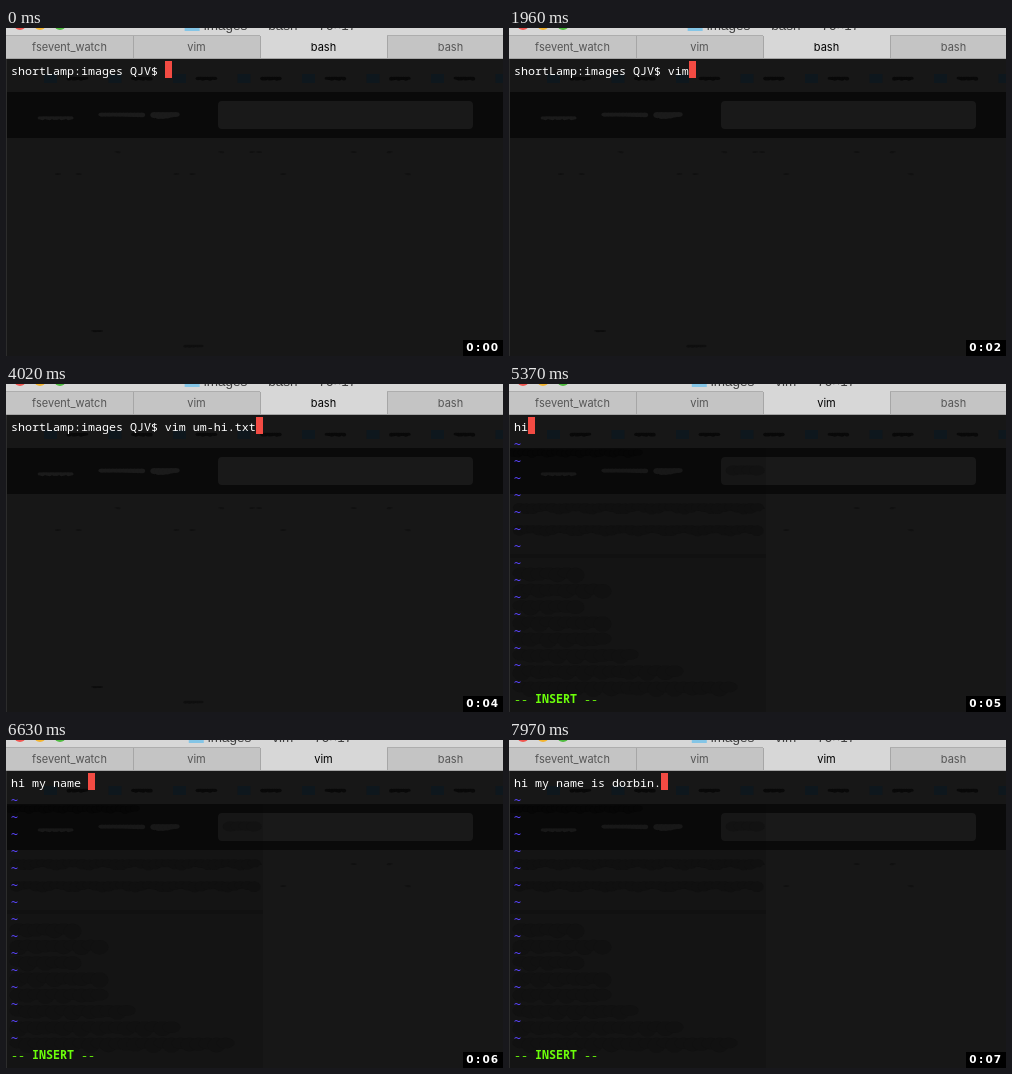
Recreate the animation shown at these times as an HTML page with a canvas. Size 497 px wide and 328 px high, loop 8000 ms.

```html
<!DOCTYPE html>
<html lang="en">
<head>
<meta charset="utf-8">
<title>Terminal session</title>
<style>
  html, body { margin: 0; width: 100%; height: 100%; overflow: hidden; background: #171717; }
  canvas { display: block; width: 497px; height: 328px; }
</style>
</head>
<body>
<canvas id="stage" width="497" height="328"></canvas>
<script>
const ctx = document.getElementById('stage').getContext('2d');

const WIDTH = 497, HEIGHT = 328, LOOP = 8000;
const CELL = 7, LINE = 17, LEFT = 5, TOP = 33;
const TAB = 127, TAB_TOP = 7, SCREEN_TOP = 31;
const MONO = '11.667px "Noto Sans Mono", "DejaVu Sans Mono", monospace';
const TILDE = '11.627px "DejaVu Sans Mono", monospace';
const LABEL = '11px Inter, "Liberation Sans", sans-serif';
const TITLE = '13.5px "Liberation Sans", Arial, sans-serif';
const CLOCK = 'bold 10.5px "DejaVu Sans", sans-serif';

const PROMPT = 'shortLamp:images QJV$ ';
const BLINK_OFF = 270, BLINK_ON = 810;
const VIM_OPEN = 4290, TITLE_CHANGE = 4380, INSERT_MODE = 4740;

// Bursts of typing at an even pace.
const COMMAND = [
  { at: 1260, pace: 85, keys: 'vim' },
  { at: 2050, pace: 177, keys: ' um-h' },
  { at: 2850, pace: 90, keys: 'i.' },
  { at: 3470, pace: 225, keys: 'txt' },
];
const MESSAGE = [
  { at: 5370, pace: 0, keys: 'hi' },
  { at: 5550, pace: 180, keys: ' my ' },
  { at: 6270, pace: 77, keys: 'name is ' },
  { at: 6990, pace: 90, keys: 'dor' },
  { at: 7440, pace: 85, keys: 'bin' },
  { at: 7970, pace: 0, keys: '.' },
];

const typed = (bursts, t) => bursts.map(({ at, pace, keys }) =>
  [...keys].filter((_, i) => t >= at + i * pace).join('')).join('');

// Repeatable pseudo-random number from 0 to 1.
const noise = n => {
  const v = Math.sin(n * 12.9898) * 43758.5453;
  return v - Math.floor(v);
};

function rect(x, y, w, h, color) {
  ctx.fillStyle = color;
  ctx.fillRect(x, y, w, h);
}

function disc(x, y, rx, ry, color) {
  ctx.fillStyle = color;
  ctx.beginPath();
  ctx.ellipse(x, y, rx, ry, 0, 0, Math.PI * 2);
  ctx.fill();
}

function text(str, x, y, font, color, align = 'left') {
  ctx.font = font;
  ctx.fillStyle = color;
  ctx.textAlign = align;
  ctx.fillText(str, x, y);
}

const rowText = (str, row, color, col = 0, font = MONO) =>
  text(str, LEFT + col * CELL, TOP + row * LINE + 14, font, color);

// Uneven streak, like blurred text behind translucent glass.
function smudge(x, y, w, h, color) {
  const step = Math.max(2, h * 0.6);
  for (let dx = h / 2; dx <= w - h / 2; dx += step) {
    const wobble = Math.sin((x + dx) * 1.7 + y);
    disc(x + dx, y + wobble * h * 0.08, step, h / 2 * (0.85 + wobble * 0.15), color);
  }
}

function drawBackdrop(inVim) {
  rect(0, SCREEN_TOP, WIDTH, HEIGHT - SCREEN_TOP, '#171717');

  for (let x = 44; x < WIDTH; x += 64.5) {
    rect(x - 6, 46, 13, 9, '#0e171d');
    smudge(x + 17, 50.5, 21, 4, '#090909');
  }

  rect(0, 64, WIDTH, 46, '#0a0a0a');
  ctx.fillStyle = '#191919';
  ctx.beginPath();
  ctx.roundRect(212, 73, 255, 28, 4);
  ctx.fill();

  smudge(32, 90, 36, 4, '#1b1b1b');
  smudge(93, 87, 46, 6, '#1b1b1b');
  smudge(145, 87, 32, 7, '#1b1b1b');

  for (let i = 0; i < 12; i++) {
    smudge(50 + noise(i) * 360, i % 2 ? 124 : 146, 5, 2, '#111');
  }

  if (inVim) {
    rect(0, 64, 257, HEIGHT - 64, 'rgba(0, 0, 0, 0.12)');
    smudge(0, 69, 135, 8, '#060606');
    smudge(218, 87, 40, 13, '#121212');
    for (const y of [124, 146]) smudge(5, y, 251, 11, '#101010');
    rect(0, 170, 257, 4, '#111');
    for (let i = 0; i < 8; i++) {
      const width = 75 + 30 * noise(i) + 150 * (i / 7) ** 4;
      smudge(5, 190 + i * 16.3, width, 15, '#111');
    }
  } else {
    smudge(86, 303, 10, 2, '#0c0c0c');
    smudge(178, 318, 19, 3, '#0f0f0f');
  }
  rect(0, SCREEN_TOP, 1, HEIGHT - SCREEN_TOP, '#2c2c2c');
}

function drawWindow(program) {
  rect(0, 0, WIDTH, SCREEN_TOP, '#d7d7d7');
  ['#f25650', '#f5b52e', '#4fbd3f'].forEach((color, i) => disc(14 + i * 20, -4, 6, 6, color));

  const title = `images — ${program} — 70×17`;
  ctx.font = TITLE;
  const titleX = 274 - ctx.measureText(title).width / 2;
  rect(titleX - 19, 0, 15, 3, '#84c5e6');
  text(title, titleX, 2, TITLE, '#404040');

  ['fsevent_watch', 'vim', program, 'bash'].forEach((label, i) => {
    const x = i * TAB, active = i === 2;
    if (!active) {
      rect(x, TAB_TOP, TAB, 24, '#c4c4c4');
      rect(x, TAB_TOP, TAB, 1, '#adadad');
    }
    if (i) rect(x, TAB_TOP + 1, 1, 22, '#a6a6a6');
    text(label, x + TAB / 2, 23, LABEL, active ? '#000' : '#555', 'center');
  });
  rect(0, SCREEN_TOP - 1, WIDTH, 1, '#a4a4a4');
}

function drawLine(str, cursorOn) {
  rowText(str, 0, '#fff');
  if (cursorOn) rect(LEFT + str.length * CELL, TOP, CELL, LINE, '#f34b43');
}

function drawVim(t) {
  for (let row = 1; row <= 15; row++) rowText('~', row, '#5a45ff', 0, TILDE);
  if (t < INSERT_MODE) {
    rowText('"um-hi.txt" [New File]', 16, '#fff');
  } else {
    rowText('--        --', 16, '#6cff0a');
    rowText('INSERT', 16, '#6cff0a', 3, 'bold ' + MONO);
  }
  drawLine(typed(MESSAGE, t), true);
}

function drawShell(t) {
  drawLine(PROMPT + typed(COMMAND, t), t < BLINK_OFF || t >= BLINK_ON);
}

function drawTimer(t) {
  const seconds = Math.floor((t + 54) / 1007);
  rect(457, 312, 40, 16, '#000');
  [...`0:0${seconds}`].forEach((char, i) =>
    text(char, 464 + i * 8.1, 323, CLOCK, '#fff', 'center'));
}

function draw(t) {
  const inVim = t >= VIM_OPEN;
  drawBackdrop(inVim);
  drawWindow(t >= TITLE_CHANGE ? 'vim' : 'bash');
  if (inVim) drawVim(t);
  else drawShell(t);
  drawTimer(t);
}

const start = performance.now();
function frame() {
  draw((performance.now() - start) % LOOP);
  requestAnimationFrame(frame);
}
frame();
</script>
</body>
</html>
```
